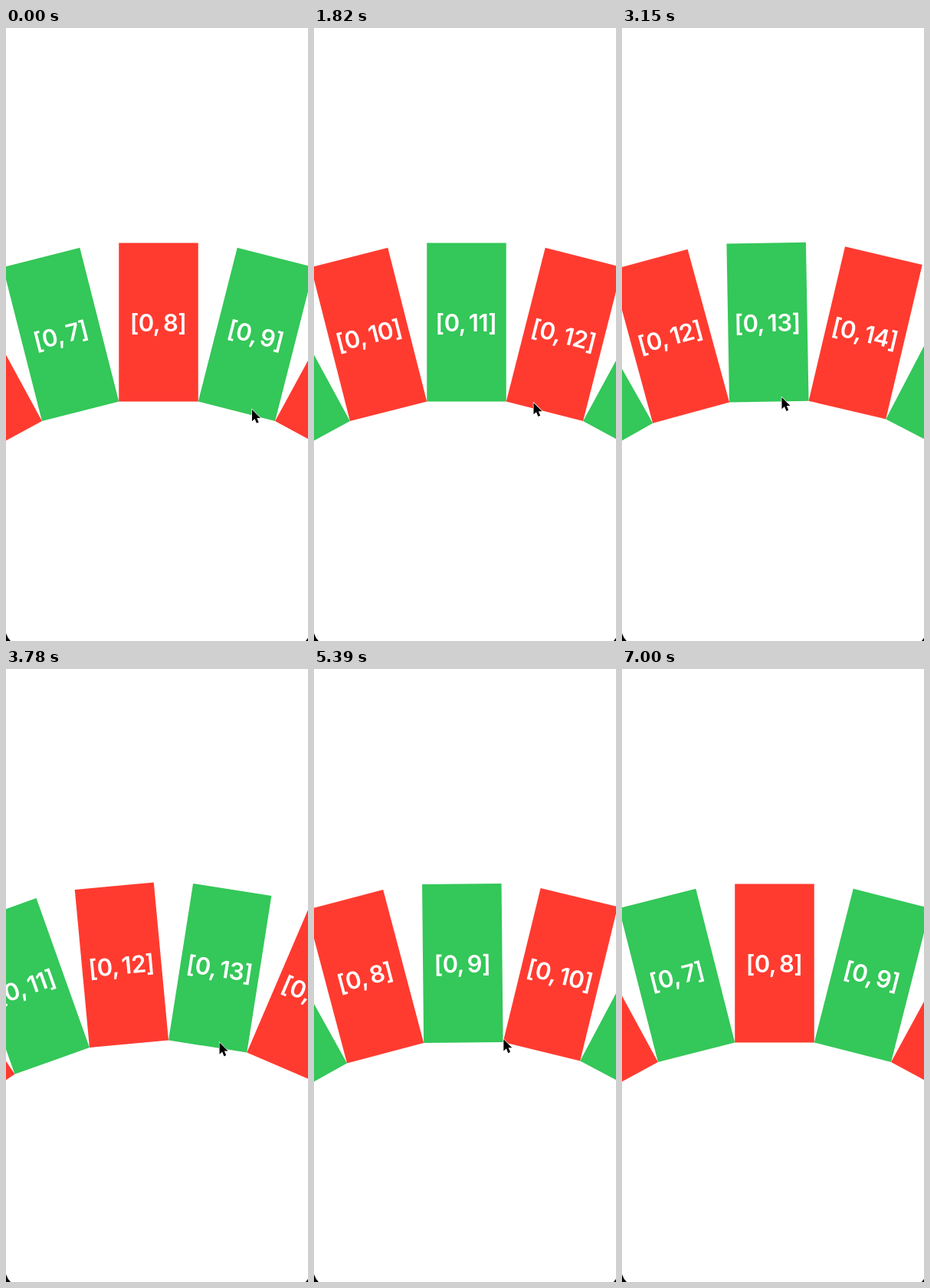
An HTML page for the animation above (7.35 s loop, 394 by 800 pixels).

```html
<!DOCTYPE html>
<html lang="en">
<head>
<meta charset="utf-8">
<title>Card wheel</title>
<style>
  html, body { margin: 0; width: 100%; height: 100%; overflow: hidden; background: #fff; }
  svg { display: block; width: 394px; height: 800px; }
  text {
    font: 600 31px Inter, "Liberation Sans", sans-serif;
    letter-spacing: -0.5px; word-spacing: -3px;
    fill: #fff; text-anchor: middle;
  }
</style>
</head>
<body>
<svg viewBox="0 0 394 800">
  <g id="wheel"></g>
  <path d="M0 790Q2 796 6 800H0ZM394 796L391 800H394Z"/>
  <path id="cursor" d="M0 0V15.2L3.5 12L6 17.8L8.7 16.5L6.3 11H11Z" stroke="#fff" stroke-width="1.3" paint-order="stroke"/>
</svg>
<script>
const LOOP = 7350, TICK = 70;
const WIDTH = 103.5, HEIGHT = 207, RADIUS = 414;
const PIVOT = { x: 199, y: 901.5 };
const STEP = 2 * Math.atan(WIDTH / 2 / RADIUS) * 180 / Math.PI;

// Where the wheel rests or turns: [time, index of the top card]
const stops = [
  [700, 8], [1260, 9], [1820, 11], [2940, 13.07], [3360, 13.07],
  [4900, 9.04], [5390, 9.04], [6230, 8]
];
const swipe = { start: 496, end: 6300, period: 1528 };

const svg = document.querySelector("svg");
const wheel = document.getElementById("wheel");
const cursor = document.getElementById("cursor");

function add(parent, tag, attributes) {
  const node = document.createElementNS(svg.namespaceURI, tag);
  for (const name in attributes) node.setAttribute(name, attributes[name]);
  return parent.appendChild(node);
}

function ease(progress) {
  const clamped = Math.min(1, Math.max(0, progress));
  return (1 - Math.cos(Math.PI * clamped)) / 2;
}

function topCard(time) {
  return stops.slice(1).reduce((position, [end, to], i) => {
    const [start, from] = stops[i];
    return position + (to - from) * ease((time - start) / (end - start));
  }, stops[0][1]);
}

// The hand swings from side to side and dips at both ends.
function cursorAt(time) {
  const swing = Math.cos(2 * Math.PI * Math.max(0, time - swipe.start) / swipe.period);
  return [217 + 104 * swing, 482 + 16 * swing ** 2];
}

const cards = [];
for (let index = 4; index <= 17; index++) {
  const node = add(wheel, "g");
  add(node, "rect", {
    x: PIVOT.x - WIDTH / 2, y: PIVOT.y - RADIUS - HEIGHT,
    width: WIDTH, height: HEIGHT, fill: index % 2 ? "#34c759" : "#ff3b30"
  });
  add(node, "text", { x: PIVOT.x - 0.5, y: 396 }).textContent = `[0, ${index}]`;
  cards.push({ index, node });
}

function draw(now) {
  const time = Math.floor(now % LOOP / TICK) * TICK;
  const position = topCard(time);
  for (const { index, node } of cards) {
    node.setAttribute("transform", `rotate(${(index - position) * STEP} ${PIVOT.x} ${PIVOT.y})`);
  }
  cursor.setAttribute("transform", `translate(${cursorAt(time)})`);
  cursor.style.display = time < swipe.end ? "" : "none";
  requestAnimationFrame(draw);
}
requestAnimationFrame(draw);
</script>
</body>
</html>
```
